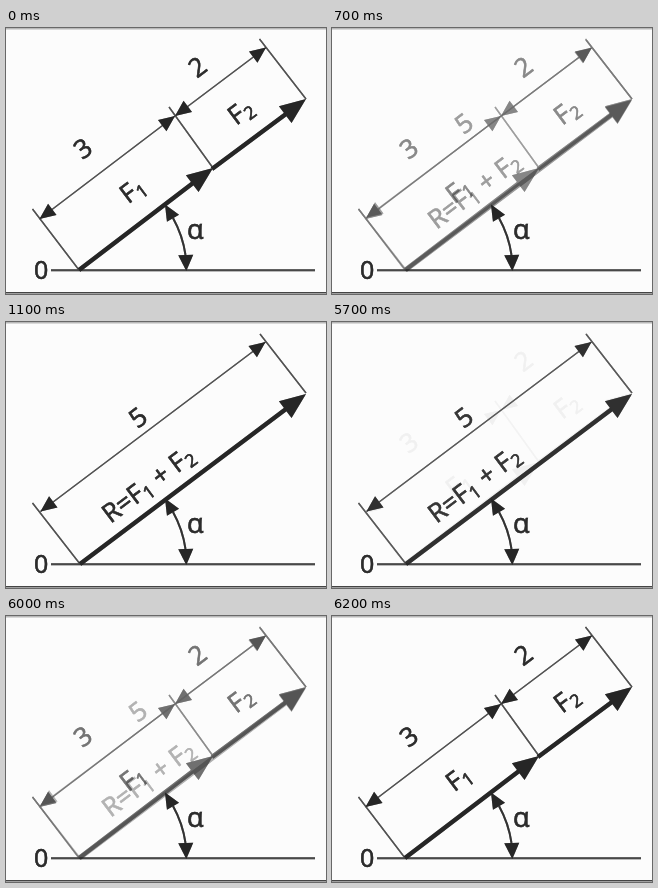
Write an HTML page that moves like this. It is 320 by 266 pixels and loops after 6800 ms.

```html
<!DOCTYPE html>
<html lang="en">
<head>
<meta charset="utf-8">
<title>Vector addition</title>
<style>
  html, body { margin: 0; width: 100%; height: 100%; overflow: hidden; background: #fcfcfc; }
  svg { display: block; width: 100%; height: 100%; }
  text { font: 26px "Open Sans", "Noto Sans", sans-serif; fill: #2c2c2c; stroke: #2c2c2c; stroke-width: .5px; }
  .sub { font-size: 18px; }
  .ink { filter: drop-shadow(.2px .4px .6px #0007); }
</style>
</head>
<body>
<svg viewBox="0 0 320 266">
  <path d="M0 .7H320" stroke="#b8b8b8" stroke-width="1.4"/>
  <path d="M0 264.8H320" stroke="#444" stroke-width="1.6"/>
  <g id="base" class="ink"></g>
  <g id="parts" class="ink"></g>
  <g id="sum" class="ink"></g>
</svg>
<script>
const TILT = -37;
const $ = id => document.getElementById(id);

const line = (x1, y1, x2, y2, width = 1.4, color = '#505050') =>
  `<path d="M${x1} ${y1}L${x2} ${y2}" stroke="${color}" stroke-width="${width}"/>`;

// Triangle with its tip at (x, y), pointing along the angle in degrees
const head = (x, y, angle, length = 16, half = 7) =>
  `<path d="M0 0L${-length} ${-half}V${half}Z" fill="#262626" transform="translate(${x} ${y}) rotate(${angle})"/>`;

// Text centred on (x, y), set along the vectors
const label = (x, y, text) =>
  `<text text-anchor="middle" y="9" transform="translate(${x} ${y}) rotate(${TILT})">${text}</text>`;

const sub = n => `<tspan class="sub" dx=".5" dy="4">${n}</tspan>`;

const dimension = (x1, y1, x2, y2) =>
  line(x1, y1, x2, y2) + head(x1, y1, TILT + 180) + head(x2, y2, TILT);

const vector = (x1, y1, x2, y2) =>
  line(x1, y1, x2 - 16, y2 + 12, 4.2, '#262626') + head(x2, y2, TILT, 26, 10.5);

$('base').innerHTML =
  line(45, 242.3, 309, 242.3, 2, '#484848') +
  '<path d="M179.5 227A108 108 0 0 0 167 190" fill="none" stroke="#333" stroke-width="2"/>' +
  head(159, 176.5, -120) + head(180.3, 243, 88, 16, 7.5) +
  '<text x="28" y="251" style="font-size:25px">0</text><text x="181" y="211" style="font-size:27px">α</text>';

$('parts').innerHTML =
  line(26.5, 181, 73, 242) + line(163, 79, 207, 140) + line(253.5, 11, 300, 71) +
  dimension(33.5, 191, 169, 88) + dimension(169, 88, 260, 19.5) +
  vector(73, 242, 207, 140) + vector(206, 141, 300, 71) +
  label(77, 120.5, '3') + label(191.5, 39, '2') +
  label(126.5, 162, 'F' + sub(1)) + label(234.5, 83.5, 'F' + sub(2));

$('sum').innerHTML =
  line(26.5, 181, 74, 242) + line(254, 12, 300, 71) +
  dimension(34.5, 189.5, 259.5, 20) + vector(74, 242, 300, 72) +
  label(132, 95.5, '5') +
  `<text transform="translate(104.5 202) rotate(${TILT})">R=F${sub(1)}<tspan dy="-4"> + F</tspan>${sub(2)}</text>`;

// Cross-fades advance once every 100 ms
const fade = (t, start, first, step) =>
  t < start ? 0 : Math.min(1, first + step * Math.floor((t - start) / 100));

function draw(now) {
  const t = now % 6800;
  const mix = fade(t, 500, .09, .18) - fade(t, 5700, .05, .2);
  $('parts').setAttribute('opacity', 1 - mix);
  $('sum').setAttribute('opacity', mix);
  requestAnimationFrame(draw);
}
draw(0);
</script>
</body>
</html>
```
